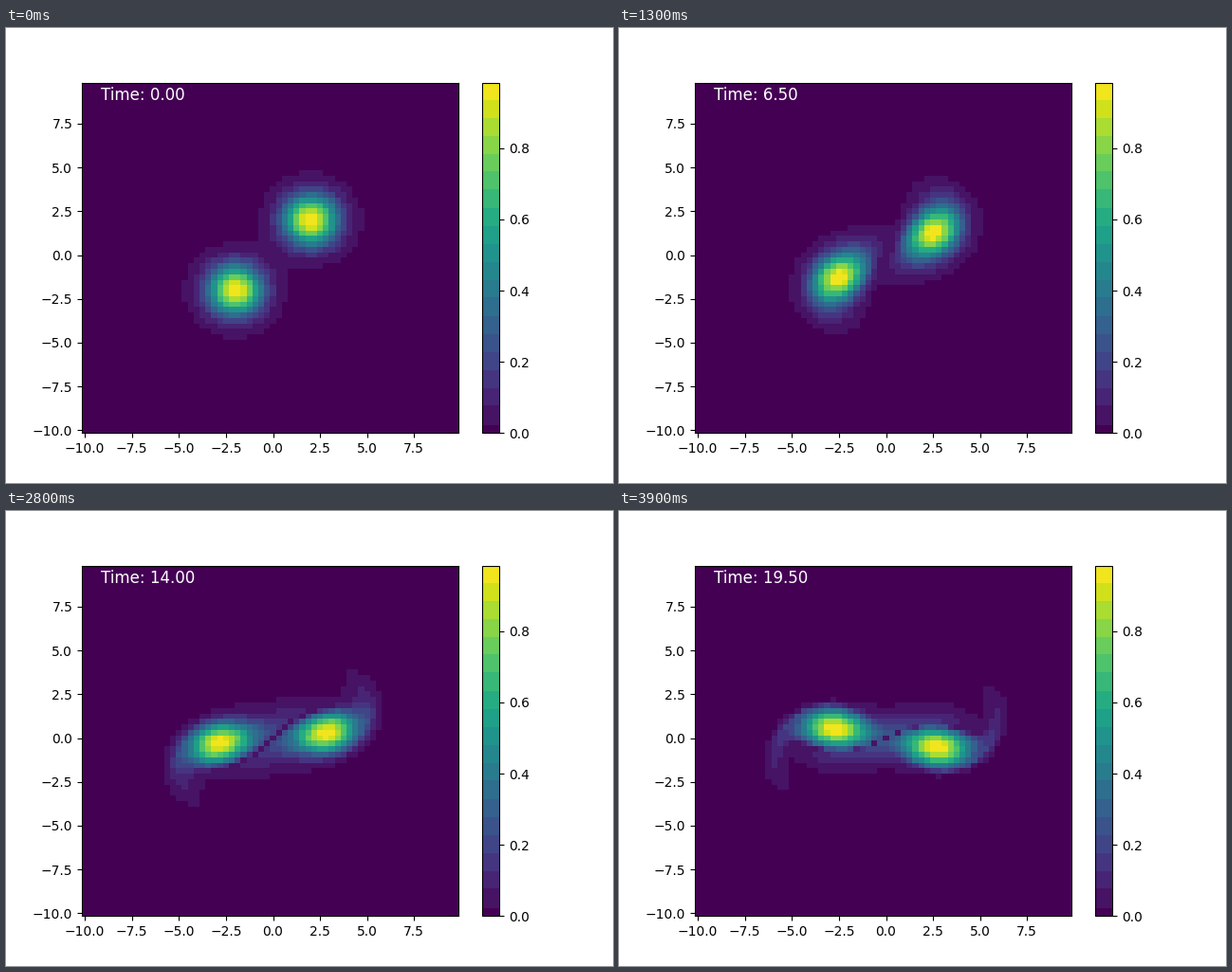
Animation of 640x480 px, one loop 4000 ms. Source, as a matplotlib script:

```python
import numpy as np
import matplotlib.pyplot as plt
from matplotlib.animation import FuncAnimation
from matplotlib.colors import ListedColormap

FRAMES, DT = 40, 0.5
N, FINE, SIZE = 64, 256, 20.0
STEP = SIZE / N

axis = -SIZE / 2 + STEP * np.arange(N)
X, Y = np.meshgrid(axis, axis)
GRID = X + 1j * Y

wave = 2 * np.pi * np.fft.fftfreq(N, STEP)
KX, KY = np.meshgrid(wave, wave)
K2 = KX**2 + KY**2
K2[0, 0] = 1


def start_vorticity(z):
    """Two Gaussian vortices on the diagonal of a periodic box."""
    half = SIZE / 2

    def wrap(a):
        return (a + half) % SIZE - half

    return sum(np.exp(-(wrap(z.real - c)**2 + wrap(z.imag - c)**2) / 2)
               for c in (-2, 2))


def velocity(w):
    """Clockwise flow u + iv of a vorticity field, on the fine grid."""
    psi = -np.fft.fft2(w) / K2
    psi[0, 0] = 0
    spectrum = np.fft.fftshift((KX + 1j * KY) * psi)
    spectrum = np.pad(spectrum, (FINE - N) // 2)
    return np.fft.ifft2(np.fft.ifftshift(spectrum)) * (FINE / N)**2


def sample(field, z):
    """Periodic bilinear lookup."""
    px = (z.real + SIZE / 2) * FINE / SIZE
    py = (z.imag + SIZE / 2) * FINE / SIZE
    i, j = np.floor(px).astype(int), np.floor(py).astype(int)
    a, b = px - i, py - j
    i0, i1, j0, j1 = i % FINE, (i + 1) % FINE, j % FINE, (j + 1) % FINE
    return ((1 - b) * ((1 - a) * field[j0, i0] + a * field[j0, i1])
            + b * ((1 - a) * field[j1, i0] + a * field[j1, i1]))


def trace_back(flows):
    """Follow the grid points back to the start through midpoint flows."""
    z = GRID
    for flow in reversed(flows):
        middle = z - DT / 2 * sample(flow, z)
        z = z - DT * sample(flow, middle)
    return z


def simulate():
    fields = [start_vorticity(GRID)]
    now = before = velocity(fields[0])
    flows = []
    for _ in range(FRAMES - 1):
        guess = 1.5 * now - 0.5 * before
        fields.append(start_vorticity(trace_back(flows + [guess])))
        before, now = now, velocity(fields[-1])
        flows.append((before + now) / 2)
    return fields


def banded_viridis(bands=19, first=6):
    """Viridis in flat bands above a short dark one."""
    width = (256 - first) / bands
    index = np.arange(256)
    band = np.floor((index - first) / width)
    middle = np.where(index < first, 0, first + (band + 0.5) * width)
    return ListedColormap(plt.get_cmap("viridis")(middle / 255))


fields = simulate()

fig, ax = plt.subplots(figsize=(6.4, 4.8), dpi=100)
mesh = ax.pcolormesh(axis, axis, fields[0], cmap=banded_viridis(),
                     vmin=0, vmax=fields[0].max(), shading="nearest")
fig.colorbar(mesh, ax=ax)
label = ax.text(0.05, 0.95, "", transform=ax.transAxes,
                color="white", fontsize=12)


def draw(n):
    mesh.set_array(fields[n])
    label.set_text(f"Time: {n * DT:.2f}")
    return mesh, label


anim = FuncAnimation(fig, draw, frames=FRAMES, interval=100, repeat=True)
plt.show()
```
